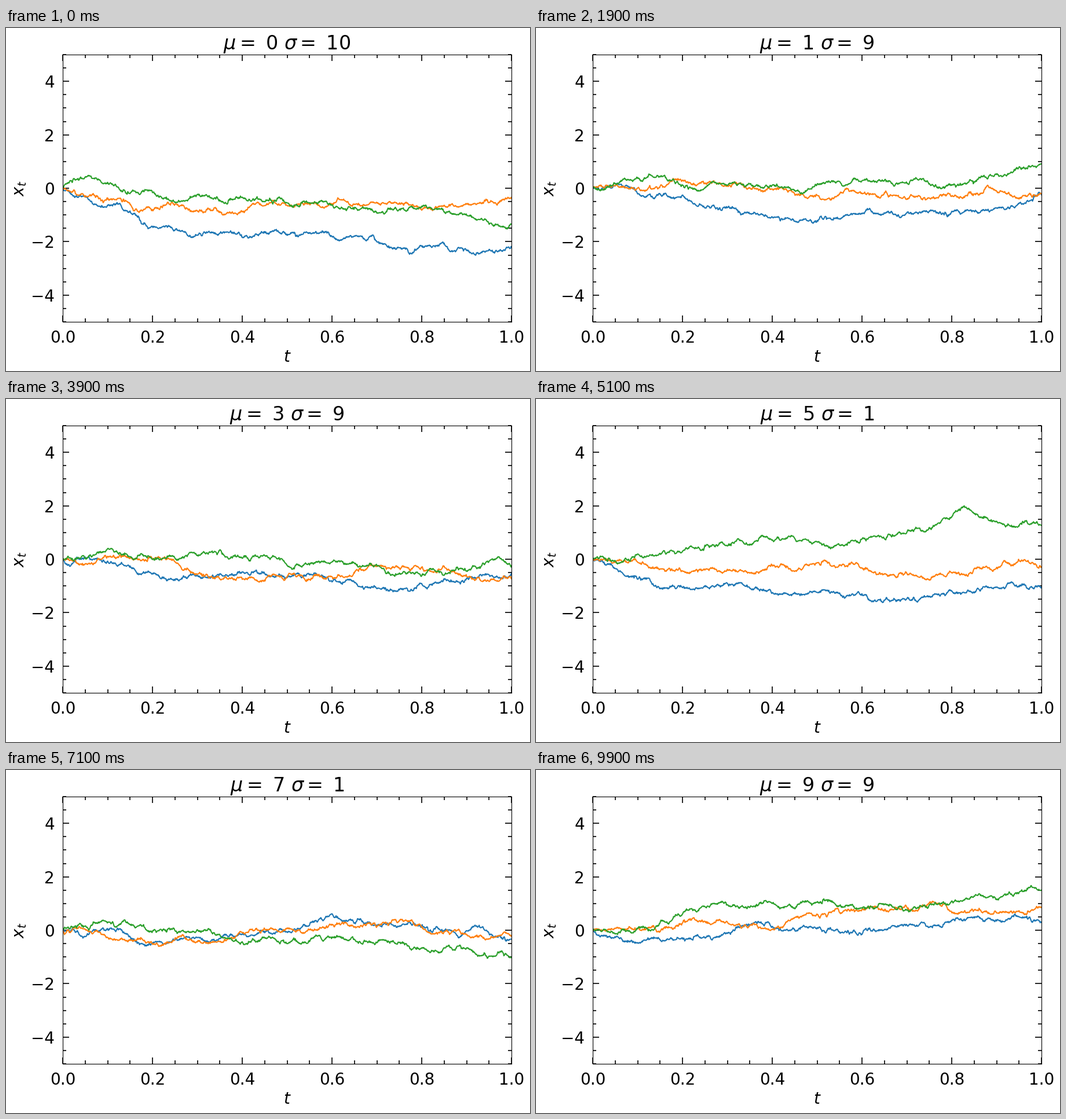
A matplotlib script that plays this animation: 905 px wide and 593 px high, repeating every 10 s.

```python
import numpy as np
import matplotlib.pyplot as plt
from matplotlib.animation import FuncAnimation
from matplotlib.ticker import AutoMinorLocator

W, H, DPI = 905, 593, 100
STEPS = 1000
SPREAD = 0.8
LEAN = np.array([-0.45, -0.3, 0.55])

plt.rcParams.update({"font.family": "DejaVu Sans", "font.size": 20,
                     "xtick.top": True, "ytick.right": True})

t = np.linspace(0, 1, STEPS + 1)


def walks(mu, sigma):
    """Three random walks of N(mu, sigma) steps, centred and scaled to t in [0, 1]."""
    rng = np.random.default_rng(100 * mu + sigma)
    steps = (rng.normal(mu, sigma, (3, STEPS)) - mu) / (sigma * STEPS ** 0.5)
    paths = np.hstack([np.zeros((3, 1)), steps.cumsum(axis=1)])
    return SPREAD * paths + np.outer(LEAN, np.sqrt(t))


fig = plt.figure(figsize=(W / DPI, H / DPI), dpi=DPI)
ax = fig.add_axes([98 / W, 85 / H, 775 / W, 462 / H])
ax.set(xlim=(0, 1), ylim=(-5, 5), xlabel="$t$", ylabel="$x_t$",
       xticks=np.linspace(0, 1, 6), yticks=range(-4, 5, 2))
for axis in (ax.xaxis, ax.yaxis):
    axis.set_minor_locator(AutoMinorLocator(4))
    axis.set_tick_params(which="major", direction="in", length=8, width=1.2, pad=10)
    axis.set_tick_params(which="minor", direction="in", length=4, width=1.2)

title = ax.set_title("")
lines = [ax.plot([], [], color=c, lw=1.5)[0] for c in ("C0", "C1", "C2")]


def draw(i):
    mu, sigma = i // 10, i % 10 or 10
    title.set_text(rf"$\mu=$ {mu} $\sigma=$ {sigma}")
    for line, path in zip(lines, walks(mu, sigma)):
        line.set_data(t, path)
    return [title, *lines]


anim = FuncAnimation(fig, draw, frames=100, interval=100, repeat=True,
                     repeat_delay=0, blit=False)
plt.show()
```
